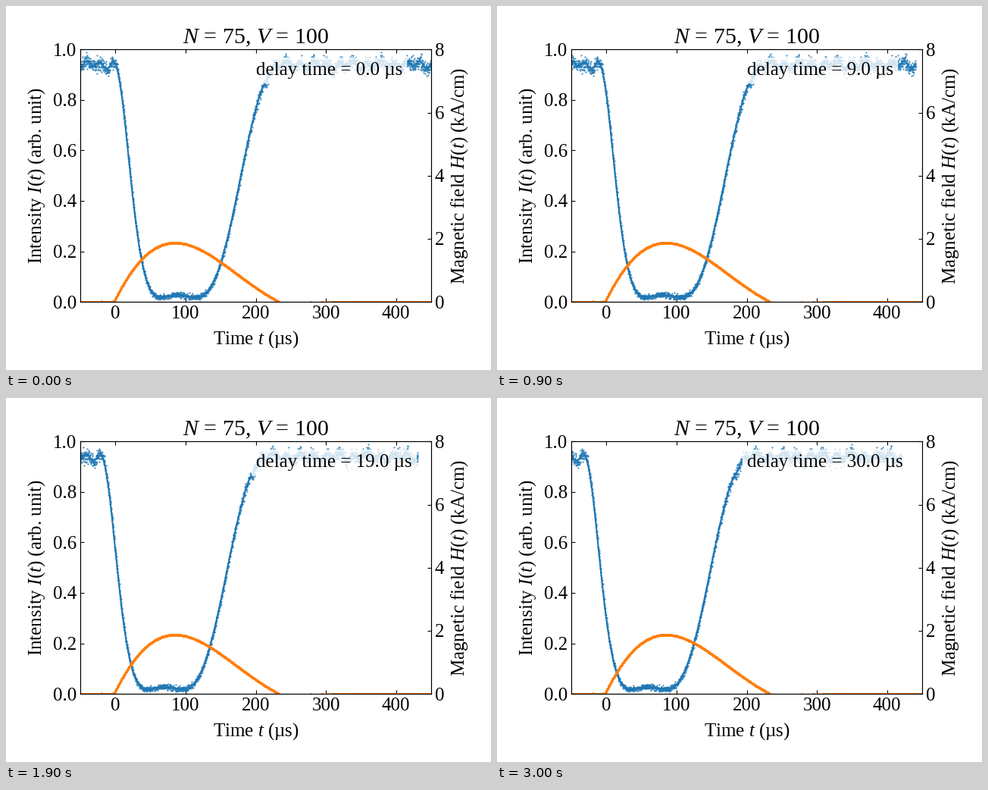
Write a matplotlib script that moves like this. It is 640 by 480 pixels and loops after 3100 ms.

```python
import numpy as np
import matplotlib.pyplot as plt
from matplotlib.animation import FuncAnimation

W, H, DPI = 640, 480, 100
FRAMES, INTERVAL = 31, 100
BLUE, ORANGE = "tab:blue", "tab:orange"

plt.rcParams.update({
    "font.family": "Liberation Serif",
    "font.size": 18,
    "mathtext.fontset": "custom",
    "mathtext.rm": "Liberation Serif",
    "mathtext.it": "Liberation Serif:italic",
    "xtick.direction": "in",
    "ytick.direction": "in",
    "xtick.top": True,
})

rng = np.random.default_rng(4)
t = np.arange(-100, 450, 0.2)


def pulse(t, amp, decay, start, length):
    """One damped half-sine, zero outside its length."""
    s = np.clip(t - start, 0, length)
    return amp * np.exp(-decay * s) * np.sin(np.pi * s / length)


def field(t):
    """Coil field in kA/cm, with a small undershoot after the pulse."""
    undershoot = np.where(t > 233, 0.06 * np.exp(-(t - 233) / 60), 0)
    h = pulse(t, 3.38, 0.0058, -2, 235) - undershoot
    return h + rng.normal(0, 0.006, t.size)


def intensity(t):
    """Light between polarizers: cos^2 of the field-driven rotation angle."""
    bright = np.cos(pulse(t, 2.93, 0.0054, -1, 237)) ** 2
    ripple = 0.011 * np.cos(2 * np.pi * (t + 3) / 19) + 0.006 * np.sin(t / 7.3)
    smooth = 0.018 + 0.922 * bright + ripple * bright ** 8
    noise = rng.normal(0, 1, t.size) * (0.005 + 0.008 * bright)
    scope = np.round((smooth + noise) / 0.004) * 0.004
    return smooth, scope


fig = plt.figure(figsize=(W / DPI, H / DPI), dpi=DPI, facecolor="white")
ax = fig.add_axes([98.05 / W, 89.95 / H, 463 / W, 332.7 / H])
ax.set_xlim(-50, 450)
ax.set_ylim(0, 1)
ax.set_xticks(range(0, 401, 100))
ax.set_title("$N$ = 75, $V$ = 100")

ax2 = ax.twinx()
ax2.set_ylim(0, 8)
ax2.set_yticks(range(0, 9, 2))

smooth, scope = intensity(t)
curve, = ax.plot(t, smooth, lw=1.5, color=BLUE)
dots, = ax.plot(t, scope, ".", ms=1, color=BLUE)
ax2.plot(t, field(t), ".", ms=2, color=ORANGE)


def label(x, y, text, angle=0):
    fig.text(x / W, 1 - y / H, text, rotation=angle, rotation_mode="anchor",
             ha="center", va="baseline")


label(329.5, 445.5, "Time $t$ (µs)")
label(46.5, 223.5, "Intensity $I(t)$ (arb. unit)", 90)
label(605, 223.5, "Magnetic field $H(t)$ (kA/cm)", 90)

caption = ax2.text(200, 7.2, "", zorder=3,
                   bbox=dict(facecolor="white", edgecolor="white", alpha=0.8))


def draw(frame):
    delay = float(frame)
    curve.set_xdata(t - delay)
    dots.set_xdata(t - delay)
    caption.set_text(f"delay time = {delay:.1f} µs")
    return curve, dots, caption


anim = FuncAnimation(fig, draw, frames=FRAMES, interval=INTERVAL,
                     repeat=True, repeat_delay=0, blit=False)
plt.show()
```
